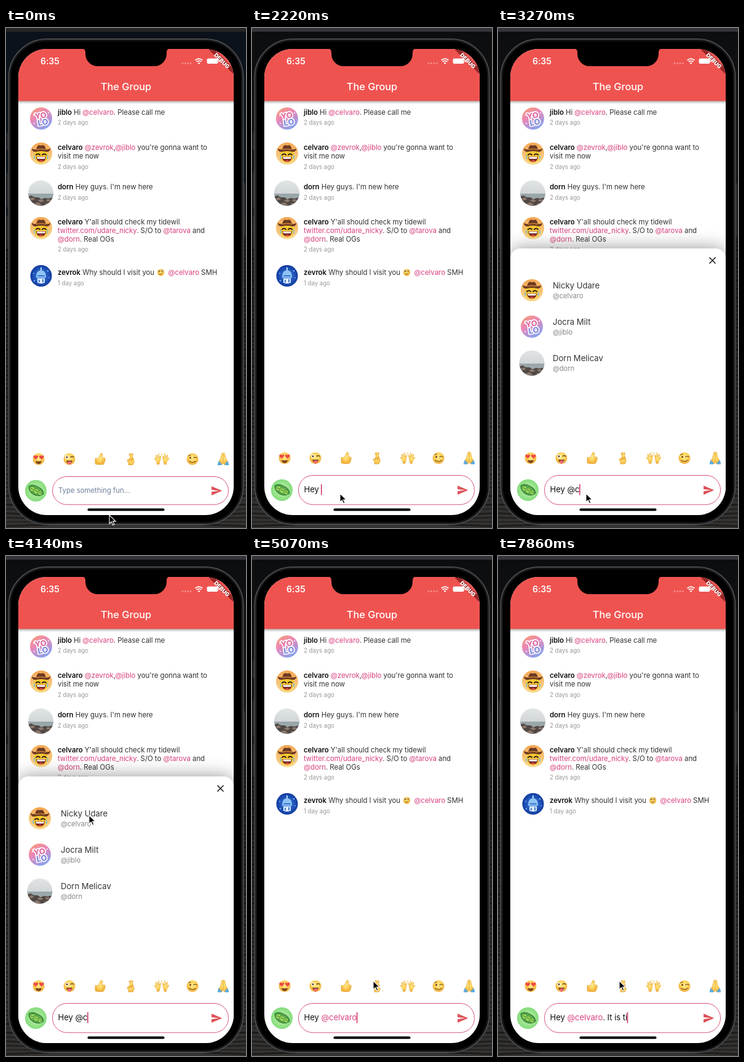
These frames come from a looping animation (390 px wide and 812 px high, 8 s). An HTML page:

```html
<!DOCTYPE html>
<html lang="en">
<head>
<meta charset="utf-8">
<title>Group chat</title>
<style>
html, body { margin: 0; width: 100%; height: 100%; overflow: hidden; background: #101114; }
svg { display: block; }
text { font: 11.45px Inter, "Open Sans", sans-serif; letter-spacing: -.05px; fill: #333; white-space: pre; }
.b { font-weight: 600; fill: #111; }
.m { fill: #d8417f; }
.ago { font-size: 9.7px; fill: #999; }
.name { font-size: 13.1px; letter-spacing: 0; }
.handle { font-size: 11.2px; fill: #888; }
#input { font-size: 13.1px; fill: #111; }
#hint { fill: #71809c; }
.line { fill: none; stroke-linecap: round; stroke-linejoin: round; }
</style>
</head>
<body>
<svg width="390" height="812" viewBox="0 0 390 812">
<defs>
  <linearGradient id="wall" x2="0" y2="1">
    <stop stop-color="#0c0d0f"/><stop offset=".4" stop-color="#1a1a1a"/><stop offset="1" stop-color="#343331"/>
  </linearGradient>
  <linearGradient id="drop" x2="0" y2="1"><stop stop-opacity=".32"/><stop offset="1" stop-opacity="0"/></linearGradient>
  <linearGradient id="candy" x2=".6" y2="1">
    <stop stop-color="#f7a26c"/><stop offset=".45" stop-color="#ee86b5"/><stop offset="1" stop-color="#8aa2ee"/>
  </linearGradient>
  <linearGradient id="sun" x2="0" y2="1"><stop stop-color="#f4a652"/><stop offset="1" stop-color="#fadb92"/></linearGradient>
  <linearGradient id="fog" x2="0" y2="1"><stop stop-color="#e2e5e6"/><stop offset="1" stop-color="#c3c9cb"/></linearGradient>
  <radialGradient id="deep"><stop stop-color="#3f86ea"/><stop offset="1" stop-color="#123a9e"/></radialGradient>
  <radialGradient id="leaf"><stop stop-color="#c9f2ae"/><stop offset="1" stop-color="#83dc7c"/></radialGradient>
  <radialGradient id="gold" cy=".4"><stop stop-color="#ffe98a"/><stop offset=".7" stop-color="#fdd258"/><stop offset="1" stop-color="#f2b340"/></radialGradient>
  <clipPath id="screen"><rect x="20" y="34" width="350" height="757" rx="46"/></clipPath>
  <clipPath id="row"><rect x="20" y="680" width="342" height="40"/></clipPath>
  <clipPath id="disc"><circle r="20.5"/></clipPath>
  <filter id="blur" x="-30%" y="-30%" width="160%" height="160%"><feGaussianBlur stdDeviation="15"/></filter>

  <g id="party">
    <circle r="18" fill="url(#candy)"/>
    <g transform="rotate(-9)" text-anchor="middle" stroke="#fff" stroke-width="3.4" paint-order="stroke" stroke-linejoin="round">
      <text y="0" style="font-size:13px;font-weight:800;fill:#e0699f">YO</text>
      <text x="2" y="11" style="font-size:13px;font-weight:800;fill:#7d86dc">LO</text>
    </g>
    <g fill="#fff"><circle cx="-12" cy="-5" r="1"/><circle cx="12" cy="-9" r="1"/><circle cx="-11" cy="8" r="1"/></g>
  </g>
  <g id="cowboy">
    <circle r="18" fill="url(#sun)"/>
    <circle cy="3" r="11.5" fill="#fcc832"/>
    <path d="M-15-9q2 3 7 2l2-5q2-3 6-1 4-2 6 1l2 5q5 1 7-2 0 7-7 6-8-2-16 0-7 1-7-6z" fill="#6d3a22"/>
    <path d="M-7.500-6.500q7.500-2 15 0" class="line" stroke="#c9843a" stroke-width="1.400"/>
    <path d="M-8 2q3-3 6 0M8 2q-3-3-6 0" class="line" stroke="#2d1a10" stroke-width="2"/>
    <path d="M-8 5h16q-1 8.500-8 8.500t-8-8.500z" fill="#6e1f1b"/><path d="M-7 5.500h14l-1 3h-12z" fill="#fff"/>
    <path d="M-4 11.500q4-2 8 0-4 3-8 0z" fill="#e6514f"/>
    <path d="M-10 3q-2 4 0 5M10 3q2 4 0 5" class="line" stroke="#6cbbe6" stroke-width="1.500"/>
  </g>
  <g id="coast" clip-path="url(#disc)">
    <path d="M-21-21h42v42h-42z" fill="url(#fog)"/>
    <path d="M-21 1h42v20h-42z" fill="#9aa7ab"/>
    <path d="M-21 6l6-2 5 3 6 0 5 3 6-2 5 1 9-2v14h-42z" fill="#4f4743"/>
    <path d="M-18 9l5-2 4 3-6 2zM-5 12l6-2 5 3-6 2zM8 11l6-1 4 3-7 1zM-10 17l6-2 6 4-9 2zM5 18l5-2 4 2z" fill="#8d7a6e"/>
  </g>
  <g id="diver">
    <circle r="17.500" fill="url(#deep)"/>
    <path d="M0-13v4" class="line" stroke="#b6dcfa" stroke-width="2"/>
    <path d="M-8 3q0-12 8-12t8 12z" fill="#8fc5f5"/>
    <path d="M-6 4h12v7q-6 3-12 0z" fill="#dceefd"/>
    <path d="M-5 0h10M-3 7v3M3 6v4" class="line" stroke="#2156b7" stroke-width="1.6"/>
    <g fill="#75b4f4"><circle cx="-12" cy="-4" r="1"/><circle cx="11" cy="-8" r="1.300"/><circle cx="13" cy="3" r=".9"/><circle cx="-11" cy="8" r="1.200"/></g>
  </g>
  <g id="peas">
    <circle r="17.500" fill="url(#leaf)"/>
    <g transform="rotate(25) scale(.88)">
      <path d="M-15-2q4-7 15-6 11 0 15 7-4 9-15 9-12-1-15-10z" fill="#5fae4c" stroke="#2f7c34" stroke-width="1.500"/>
      <g fill="#9bdc5c" stroke="#39803a" stroke-width=".8"><circle cx="-7" r="4.600"/><circle cx="1" cy=".5" r="4.800"/><circle cx="9" cy=".5" r="4"/></g>
      <g fill="#23481d"><circle cx="-8.500" r=".9"/><circle cx="-5.500" r=".9"/><circle cx="-.5" r=".9"/><circle cx="2.500" r=".9"/><circle cx="8" r=".8"/><circle cx="10.500" r=".8"/></g>
    </g>
  </g>

  <circle id="face" r="9.500" fill="url(#gold)"/>
  <path id="heart" d="M0 3.500l-3.500-3.500q-1.300-3.500 1.800-3.500l1.700 1.300 1.700-1.300q3.100 0 1.800 3.500z" fill="#ee4a45"/>
  <g id="love">
    <use href="#face"/><use href="#heart" x="-4.700" y="-2.500"/><use href="#heart" x="4.700" y="-2.500"/>
    <path d="M-5 3q5 1.500 10 0-1 5-5 5t-5-5z" fill="#7b4422"/>
  </g>
  <g id="silly">
    <use href="#face"/><circle cx="-4" cy="-3" r="2.700" fill="#fff"/><circle cx="-4" cy="-3" r="1.500" fill="#5b3418"/>
    <path d="M2-3q2-2 5 0" class="line" stroke="#6b4220" stroke-width="1.400"/>
    <path d="M-5 2.500h10q-1 5-5 5t-5-5z" fill="#7b4422"/><path d="M-2.500 4h5.500v3q-2.700 4-5.500 0z" fill="#f2657c"/>
  </g>
  <g id="wink">
    <use href="#face"/><ellipse cx="-3.500" cy="-2" rx="1.300" ry="1.800" fill="#6b4220"/>
    <path d="M2-2q2-2 5 0M-5 3.500q5 4 10 0M-6-5.500l3-1" class="line" stroke="#6b4220" stroke-width="1.200"/>
  </g>
  <g id="smirk">
    <use href="#face"/>
    <path d="M-6-2h4M2-2h4M-4 4.500q6 1 8-2M-6-5l4 1M2-5l4-1" class="line" stroke="#6b4220" stroke-width="1.400"/>
  </g>
  <g id="thumb" fill="url(#gold)" stroke="#e3a63c" stroke-width=".7">
    <path d="M-8-1h5l4-8q3-1 3 2l-1 5h4q2 1 1 3 1 2-1 3 1 2-1 3 0 2-2 2h-8l-4-1z"/>
    <path d="M3 1h5M3 4h4" class="line"/>
  </g>
  <g id="luck" fill="url(#gold)" stroke="#e3a63c" stroke-width=".7">
    <path d="M-4 9.500v-3l-2-4q0-2 3-2h6q3 1 2 5l-2 4z"/>
    <path d="M1 1l-4-8q0-2.500 2.500-2l5 9z"/>
    <path d="M-3 1l3.500-9q2-2 3 0l-2.500 9.500z"/>
    <path d="M-5 3l6-1v3l-4 1" class="line"/>
  </g>
  <path id="hand" d="M-3 8l-1-5-4-6q0-2 2-1l2 2-2-7q1-2 2 0l2 5v-6q1-2 2 0l.5 6 2-4q2-1 1.500 1l-1 7-2 8z" fill="url(#gold)" stroke="#e3a63c" stroke-width=".6"/>
  <g id="cheer">
    <use href="#hand" transform="translate(-5 2) scale(.85)"/><use href="#hand" transform="translate(5 2) scale(-.85 .85)"/>
    <path d="M0-6v-3M-4-7l-1-2M4-7l1-2" class="line" stroke="#f2c45a" stroke-width="1.200"/>
  </g>
  <g id="pray">
    <path d="M0-9.500q-2.500-1-2.500 1.500l-2 8-2.500 4 4 6 3-3 3 3 4-6-2.500-4-2-8q0-2.500-2.500-1.500z" fill="url(#gold)" stroke="#e3a63c" stroke-width=".7"/>
    <path d="M0-8V6" stroke="#e3a63c"/><path d="M-7.500 3l5.500 5.500-2 1.500h-5.500zM7.500 3l-5.500 5.500 2 1.500h5.500z" fill="#5aa9dd"/>
  </g>
</defs>

<rect width="390" height="812" fill="url(#wall)"/>
<g id="rock" stroke="#000" opacity=".45"></g>
<rect id="night" width="390" height="300" fill="#0a1422"/>
<rect id="strip" width="390" height="6"/>
<path d="M1 170h4v28h-4zM1 235h4v56h-4zM1 306h4v50h-4zM385 252h4v88h-4z" fill="#28292b"/>
<rect x="4.500" y="18" width="381" height="788" rx="62" fill="#000" stroke="#4b4c4e" stroke-width="2"/>
<rect x="7" y="20.500" width="376" height="783" rx="59" fill="none" stroke="#17181a" stroke-width="2"/>

<g clip-path="url(#screen)">
  <rect x="20" y="34" width="350" height="757" fill="#fff"/>
  <rect x="20" y="118" width="350" height="5.500" fill="url(#drop)"/>
  <rect x="20" y="34" width="350" height="84.500" fill="#ef5350"/>
  <text x="195" y="101" text-anchor="middle" style="font-size:16.400px;font-weight:500;fill:#fff">The Group</text>
  <text x="56" y="59" style="font-size:14px;font-weight:600;fill:#fff">6:35</text>
  <path d="M123.500 33q5.500 1 5.500 6v3a20 20 0 0 0 20 20h92a20 20 0 0 0 20-20v-3q0-5 5.500-6z"/>
  <g fill="#fff">
    <g opacity=".35"><circle cx="287" cy="57.500" r="1.400"/><circle cx="291.500" cy="57.500" r="1.400"/><circle cx="296" cy="57.500" r="1.400"/><circle cx="300.500" cy="57.500" r="1.400"/></g>
    <path d="M313.500 59l-2-2.300q2-1.500 4 0z"/>
    <path d="M307.500 52.300q6-5 12 0M309.500 54.800q4-3 8 0" fill="none" stroke="#fff" stroke-width="1.700"/>
    <rect x="326.500" y="49.500" width="18" height="8.500" rx="2.500"/><rect x="345.500" y="52" width="1.300" height="3.500" rx=".6"/>
  </g>
  <path d="M328.500 34h9.100l32.400 32.400v9.100z" fill="#8a1f1f" opacity=".85"/>
  <text transform="translate(350.800 53.200) rotate(45)" y="3.200" text-anchor="middle" style="font-size:9px;font-weight:900;fill:#fff">DEBUG</text>

  <use href="#party" x="57" y="147"/>
  <text x="84" y="141"><tspan class="b">jiblo</tspan> Hi <tspan class="m">@celvaro</tspan>. Please call me</text>
  <text x="84" y="157" class="ago">2 days ago</text>
  <use href="#cowboy" x="57" y="204"/>
  <text x="84" y="198"><tspan class="b">celvaro</tspan> <tspan class="m">@zevrok</tspan>,<tspan class="m">@jiblo</tspan> you're gonna want to</text>
  <text x="84" y="212">visit me now</text>
  <text x="84" y="228.500" class="ago">2 days ago</text>
  <use href="#coast" x="56.500" y="268"/>
  <text x="84" y="262"><tspan class="b">dorn</tspan> Hey guys. I'm new here</text>
  <text x="84" y="278.500" class="ago">2 days ago</text>
  <use href="#cowboy" x="57" y="325"/>
  <text x="84" y="319"><tspan class="b">celvaro</tspan> Y'all should check my tidewil</text>
  <text x="84" y="333"><tspan class="m">twitter.com/udare_nicky</tspan>. S/O to <tspan class="m">@tarova</tspan> and</text>
  <text x="84" y="347"><tspan class="m">@dorn</tspan>. Real OGs</text>
  <text x="84" y="363" class="ago">2 days ago</text>
  <use href="#diver" x="57" y="402.500"/>
  <text x="84" y="401"><tspan class="b">zevrok</tspan> Why should I visit you</text>
  <use href="#smirk" transform="translate(251.500 397) scale(.6)"/>
  <text x="263.500" y="401"><tspan class="m">@celvaro</tspan> SMH</text>
  <text x="84" y="418" class="ago">1 day ago</text>

  <g id="sheet">
    <rect x="20" y="358" width="350" height="460" rx="16" opacity=".42" filter="url(#blur)"/>
    <rect x="20" y="358" width="350" height="460" rx="16" fill="#fff"/>
    <path d="M343.500 372.500l10 10m0-10l-10 10" stroke="#222" stroke-width="1.600"/>
    <use href="#cowboy" x="55" y="426"/>
    <text x="89" y="423" class="name">Nicky Udare</text><text x="89" y="439" class="handle">@celvaro</text>
    <use href="#party" x="55" y="485"/>
    <text x="89" y="482" class="name">Jocra Milt</text><text x="89" y="498" class="handle">@jiblo</text>
    <use href="#coast" x="55" y="544"/>
    <text x="89" y="541" class="name">Dorn Melicav</text><text x="89" y="557" class="handle">@dorn</text>
  </g>

  <g clip-path="url(#row)"><g id="emojis"></g></g>
  <rect id="pill" x="75.500" width="286" rx="23.500" fill="#fff" stroke="#d85478"/>
  <g id="tools">
    <use href="#peas" x="48.500" y="751.500"/>
    <path transform="translate(332.400 741.700) scale(.818)" d="M2 21l21-9L2 3v7l15 2-15 2z" fill="#de5258"/>
  </g>
  <text id="hint" x="85" y="754.500">Type something fun...</text>
  <text id="input" x="84.500" y="754"><tspan></tspan><tspan class="m"></tspan><tspan></tspan></text>
  <rect id="caret" y="741" width="1.700" height="17.500" fill="#d8416a"/>
  <rect x="132.500" y="780.300" width="125" height="4" rx="2"/>
</g>
<path id="mouse" d="M0 0v14l3.300-3 2.400 5.300 2.300-1-2.400-5.200h4.600z" stroke="#fff" stroke-width="1.100"/>
</svg>
<script>
const $ = id => document.getElementById(id);
const LOOP = 8000, TAG = "@celvaro";
// One time per key: "+" picks the tag from the list, "<" is backspace.
const KEYS = "Hey @c+<. It is tine <<<";
const TIMES = [1080, 1260, 1440, 1740, 2790, 3060, 4260, 5070, 5310, 5400, 5670, 5910,
  6060, 6270, 6360, 6540, 6720, 6840, 7020, 7050, 7320, 7590, 7710, 7860];
const FOCUS = 420, FIRST = TIMES[0], OPEN = TIMES[5], PICK = TIMES[6];
// time, x, y
const PATH = [[30, 168, 791], [420, 143, 756], [3290, 143, 756], [4020, 135, 421],
  [4230, 135, 421], [4320, 142, 427], [4590, 197, 690]];

const clamp = v => Math.min(1, Math.max(0, v));
const ramp = (t, from, to) => clamp((t - from) / (to - from));
const ease = p => p * p * (3 - 2 * p);
const mix = (a, b, p) => a + (b - a) * p;

["love", "silly", "thumb", "luck", "cheer", "wink", "pray"].forEach((name, i) => {
  $("emojis").innerHTML += `<use href="#${name}" x="${53 + 50 * i}" y="700"/>`;
});

// Uneven dark cracks in the wall behind the phone
let cracks = "";
for (let y = 340; y < 812; y += 7) {
  const slope = 4 * Math.sin(y * 1.7);
  cracks += `<path d="M0 ${y}l70 ${slope}M320 ${y + slope}l70 ${-slope}" stroke-width="${2 + Math.sin(y * 2.3)}"/>`;
}
$("rock").innerHTML = cracks;

const [head, tag, tail] = $("input").children;

function typed(t) {
  let text = "", last = FOCUS;
  TIMES.forEach((time, i) => {
    if (time > t) return;
    const key = KEYS[i];
    text = key === "+" ? `Hey ${TAG} ` : key === "<" ? text.slice(0, -1) : text + key;
    last = time;
  });
  return [text, last];
}

function blink(age) {
  if (age < 480) return 1;
  const p = (age - 480) % 660;
  return p < 330 ? 1 - clamp(p / 120) : clamp((p - 330) / 120);
}

function pointer(t) {
  const i = PATH.findIndex(p => p[0] > t);
  if (i < 0) return PATH[PATH.length - 1].slice(1);
  if (i === 0) return PATH[0].slice(1);
  const [t0, x0, y0] = PATH[i - 1], [t1, x1, y1] = PATH[i];
  const p = ease(ramp(t, t0, t1));
  return [mix(x0, x1, p), mix(y0, y1, p)];
}

function draw(t) {
  const wake = ramp(t, 30, 420), lift = t < FIRST ? 0 : 1;
  $("strip").setAttribute("fill", `rgb(${mix(37, 52, wake)},${mix(37, 53, wake)},${mix(38, 58, wake)})`);
  $("night").setAttribute("opacity", .6 * (1 - wake));

  const [text, last] = typed(t), at = text.indexOf(TAG);
  head.textContent = at < 0 ? text : text.slice(0, at);
  tag.textContent = at < 0 ? "" : TAG;
  tail.textContent = at < 0 ? "" : text.slice(at + TAG.length);
  $("caret").setAttribute("x", 84 + (text ? $("input").getComputedTextLength() : 0));
  $("caret").setAttribute("opacity", t < FOCUS ? 0 : blink(t - last));
  $("hint").setAttribute("opacity", 1 - ramp(t, FIRST, FIRST + 60));

  $("pill").setAttribute("y", 728.5 - 2 * lift);
  $("pill").setAttribute("height", 45.5 + 2 * lift);
  $("tools").setAttribute("transform", `translate(0 ${-lift})`);
  $("emojis").setAttribute("transform", `translate(0 ${-1.5 * lift})`);

  const shown = t >= OPEN && t < PICK;
  $("sheet").setAttribute("display", shown ? "inline" : "none");
  $("sheet").setAttribute("transform", `translate(0 ${433 * (1 - ease(ramp(t, OPEN, OPEN + 150)))})`);
  $("mouse").setAttribute("transform", `translate(${pointer(t)})`);
}

const start = performance.now();
function tick() {
  draw((performance.now() - start) % LOOP);
  requestAnimationFrame(tick);
}
tick();
</script>
</body>
</html>
```
